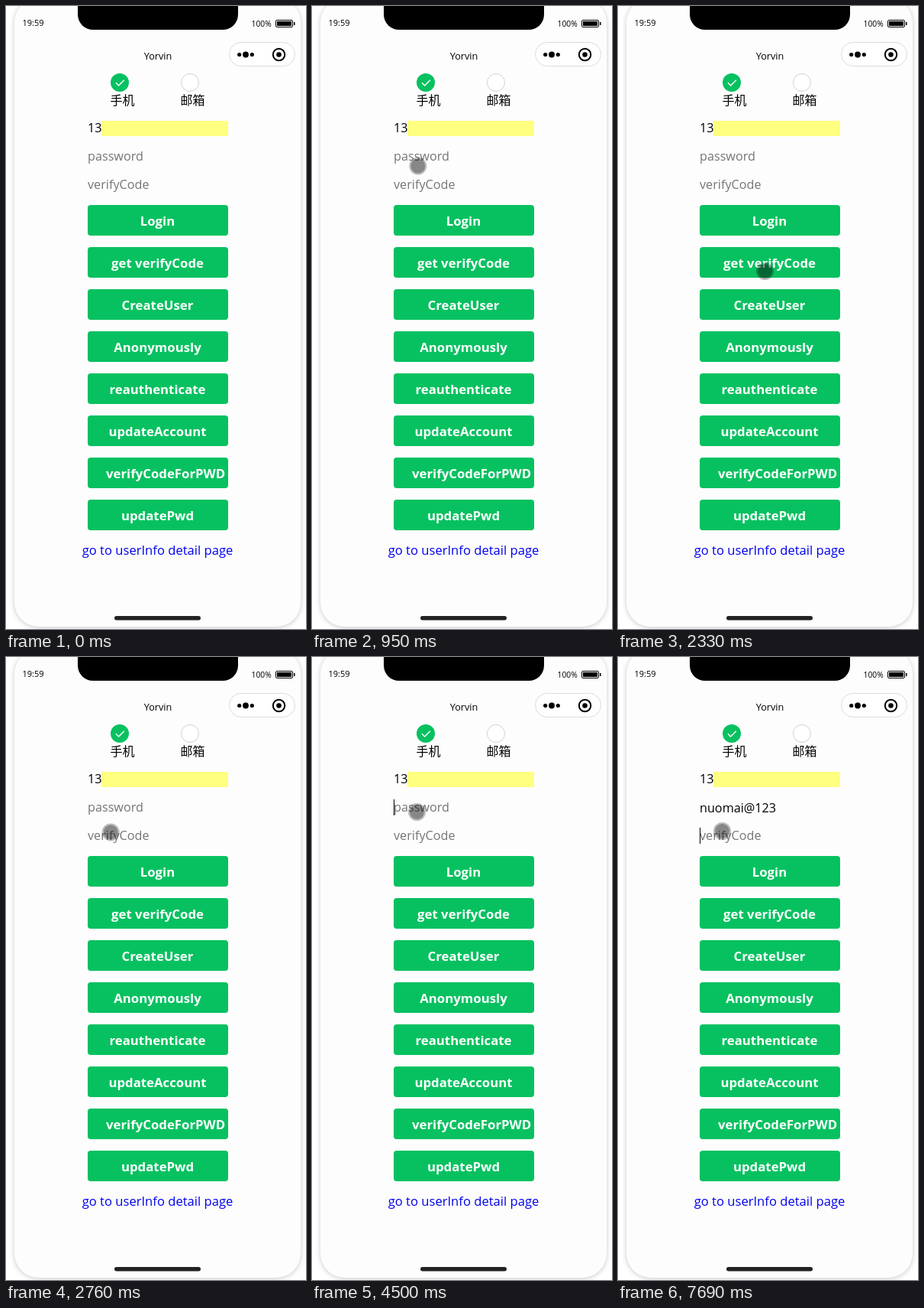
Recreate the animation shown at these times as an HTML page. Size 393 by 814 pixels, loop 8 s.

```html
<!DOCTYPE html>
<html lang="en">
<head>
<meta charset="utf-8">
<title>Login form</title>
<style>
  html, body { margin: 0; width: 100%; height: 100%; overflow: hidden; background: #fff; }
  svg { display: block; }
  text { font: 16.2px "Open Sans", "Noto Sans", "Noto Sans CJK SC", "Noto Sans CJK", sans-serif; white-space: pre; }
  .mid { text-anchor: middle; }
  .hint { fill: #757575; }
  .btn text { font-size: 16.8px; font-weight: 700; fill: #fff; }
  .cjk { font-size: 16px; }
  .phone { filter: drop-shadow(0 1px 3px rgba(0, 0, 0, .22)); }
</style>
</head>
<body>
<svg width="393" height="814" viewBox="0 0 393 814">
  <rect class="phone" x="11" y="-10" width="375" height="821" rx="32" fill="#fdfdfd"/>
  <rect x="94" y="-40" width="210" height="71" rx="20"/>
  <text x="21.5" y="25.5" style="font-size:11px">19:59</text>
  <text x="321.5" y="27" style="font-size:10.3px">100%</text>
  <rect x="353.5" y="18.5" width="22" height="9" rx="1.5" fill="none" stroke="#000"/>
  <rect x="355" y="20" width="19" height="6"/>
  <rect x="377" y="21" width="1.5" height="4"/>
  <text class="mid" x="199" y="70" style="font-size:12.7px">Yorvin</text>

  <rect x="292.5" y="47.5" width="86" height="31" rx="15.5" fill="#fff" stroke="#dcdcdc"/>
  <circle cx="305.7" cy="63.5" r="2.6"/>
  <circle cx="314" cy="63.5" r="3.9"/>
  <circle cx="322.3" cy="63.5" r="2.6"/>
  <circle cx="357.5" cy="63.5" r="7.7" fill="none" stroke="#000" stroke-width="2"/>
  <circle cx="357.5" cy="63.5" r="3.3"/>

  <circle cx="149" cy="100" r="12" fill="#07c160"/>
  <path d="M144 100.3l3.6 3.6 7.2-7.2" fill="none" stroke="#fff" stroke-width="1.4"/>
  <circle cx="241" cy="100" r="11.5" fill="#fff" stroke="#d1d1d1"/>
  <text class="cjk" x="136.5" y="129">手机</text>
  <text class="cjk" x="228.5" y="129">邮箱</text>

  <text x="107" y="165">13</text>
  <rect x="125" y="150" width="166" height="20" fill="#ffff80"/>
  <text id="hint" class="hint" x="107" y="202">password</text>
  <text id="typed" x="107" y="203"></text>
  <text class="hint" x="107" y="239">verifyCode</text>
  <g id="buttons"></g>
  <text class="mid" x="198.5" y="717" fill="#0000ee" style="font-size:16.6px">go to userInfo detail page</text>
  <rect x="142" y="797" width="113" height="5.5" rx="2.75" fill="#222"/>

  <g id="toast">
    <rect x="139" y="297" width="120" height="120" rx="5" fill="#4c4c4c"/>
    <path d="M179 346l13 13.5 28.5-27.5" fill="none" stroke="#f4f4f4" stroke-width="3.8"/>
    <text class="mid" x="198.5" y="390" fill="#eee" style="font-size:13.4px">send ok</text>
  </g>
  <rect id="caret" width="1" height="21"/>
  <g id="cursor">
    <circle r="11.5" fill-opacity=".26"/>
    <circle r="9.4" fill-opacity=".28"/>
  </g>
</svg>
<script>
const LOOP = 8000, BLINK = 510, PRESS = 130;
const PASSWORD = "nuomai@123", TYPE_START = 4830, KEY_GAP = 184;
const FOCUS_PASSWORD = 3350, FOCUS_CODE = 7690;

const $ = id => document.getElementById(id);
const within = (t, a, b) => t >= a && t < b;
const show = (el, on) => el.setAttribute("visibility", on ? "visible" : "hidden");
const easeOut = u => 1 - (1 - u) ** 2.2;

const labels = ["Login", "get verifyCode", "CreateUser", "Anonymously",
  "reauthenticate", "updateAccount", "verifyCodeForPWD", "updatePwd"];
$("buttons").innerHTML = labels.map((label, i) => `
  <svg class="btn" x="107" y="${260 + 55 * i}" width="184" height="40">
    <rect width="184" height="40" rx="4" fill="#07c160"/>
    <text x="91.5" y="27" class="mid">${label}</text>
  </svg>`).join("");
const sendButton = $("buttons").children[1].querySelector("rect");

// A label too wide for the 24px side padding starts at the padding and is clipped
for (const text of document.querySelectorAll(".btn text")) {
  if (text.getComputedTextLength() > 136) {
    text.removeAttribute("class");
    text.setAttribute("x", 24);
  }
}

// Each stop eases on from the one before; bend is the curve's control point
const entry = [321, 775];
const stops = [
  { from: 130, to: 900, at: [140.5, 210.5], bend: [325, 500] },
  { from: 900, to: 1130, at: [136.5, 207] },
  { from: 1280, to: 1920, at: [192.5, 346.5] },
  { from: 2480, to: 3220, at: [137.5, 202.5], bend: [122, 222] },
  { from: 7230, to: 7330, at: [136.5, 227.5] }
];
const presses = [2150, FOCUS_PASSWORD - PRESS, FOCUS_CODE - PRESS];

function pointer(t) {
  const i = stops.findLastIndex(s => t >= s.from);
  if (i < 0) return null;
  const { from, to, at, bend } = stops[i];
  const prev = i ? stops[i - 1].at : entry;
  const u = easeOut(Math.min(1, (t - from) / (to - from)));
  return at.map((end, k) => {
    const mid = bend ? bend[k] : (prev[k] + end) / 2;
    return (1 - u) ** 2 * prev[k] + 2 * u * (1 - u) * mid + u * u * end;
  });
}

function draw(t) {
  const pos = pointer(t), cursor = $("cursor");
  // The pointer hides while Shift is held for the @
  show(cursor, pos && !within(t, 5750, 6030));
  if (pos) cursor.setAttribute("transform", `translate(${pos})`);
  const pressed = presses.some(p => within(t, p, p + PRESS));
  cursor.lastElementChild.setAttribute("fill-opacity", pressed ? 0.38 : 0.28);

  sendButton.setAttribute("fill", within(t, 2200, 2330) ? "#06ae56" : "#07c160");
  show($("toast"), within(t, 2900, 4500));

  const typed = $("typed"), caret = $("caret");
  const keys = Math.max(0, Math.min(PASSWORD.length, Math.floor((t - TYPE_START) / KEY_GAP) + 1));
  const text = PASSWORD.slice(0, keys);
  if (typed.textContent !== text) typed.textContent = text;
  show($("hint"), !keys);

  const inCode = t >= FOCUS_CODE;
  const lastInput = inCode ? FOCUS_CODE
    : keys ? TYPE_START + (keys - 1) * KEY_GAP
    : FOCUS_PASSWORD;
  const width = keys && !inCode ? typed.getComputedTextLength() : 0;
  caret.setAttribute("x", Math.round(107 + width));
  caret.setAttribute("y", inCode ? 223 : 186);
  show(caret, t >= FOCUS_PASSWORD && Math.floor((t - lastInput) / BLINK) % 2 === 0);
}

const start = performance.now();
function tick() {
  draw((performance.now() - start) % LOOP);
  requestAnimationFrame(tick);
}
tick();
</script>
</body>
</html>
```
